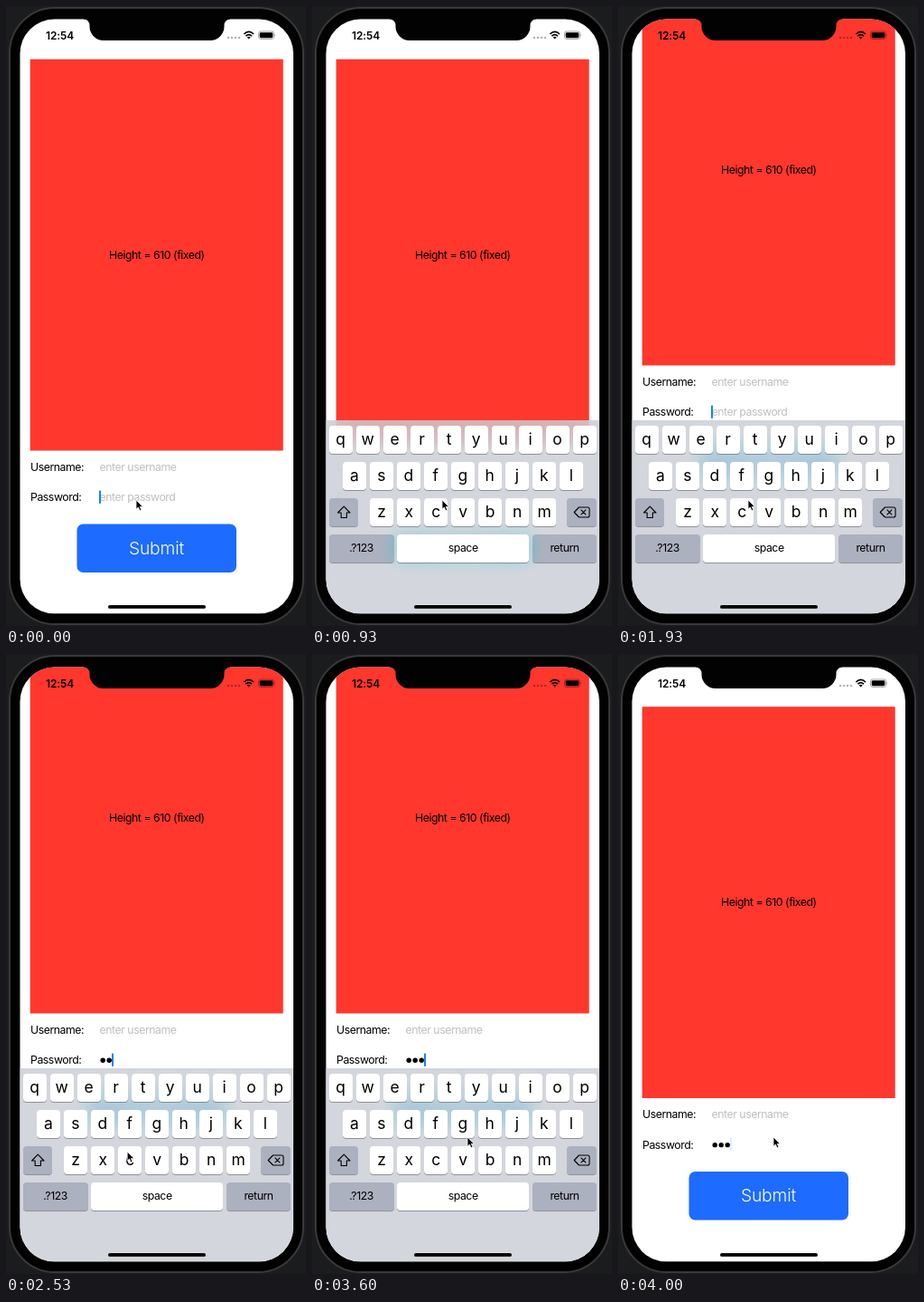
Recreate the animation shown at these times as an HTML page. Size 332 by 684 pixels, loop 4.07 s.

```html
<!DOCTYPE html>
<html lang="en">
<head>
<meta charset="utf-8">
<title>Keyboard avoidance</title>
<style>
  html, body { margin: 0; width: 100%; height: 100%; overflow: hidden; background: #1b1c1e; }
  #stage { position: relative; width: 332px; height: 684px; overflow: hidden;
    font: 400 12.3px Inter, "Open Sans", sans-serif; letter-spacing: -.46px; }
  #stage > *, #content, #keyboard, #blur, .key { position: absolute; }
  svg { display: block; overflow: visible; }
  #body { left: 3px; top: 1px; width: 323px; height: 678px; background: #020202;
    border: 2px solid #39393b; border-radius: 51px; }
  #screen { inset: 0; background: #fff; clip-path: inset(14.5px 14px 13.7px 15.5px round 38px); }
  #content { left: 0; top: 0; }
  #keyboard { left: 15px; top: 457px; width: 304px; height: 227px; }
  #blur { inset: 0; background: rgba(200, 204, 212, .8);
    backdrop-filter: blur(15px) brightness(1.6); }
  .key { box-sizing: border-box; border-radius: 4px; background: #fff; color: #000;
    box-shadow: 0 1px 0 rgba(60, 62, 70, .45); text-align: center; height: 31px; line-height: 30px; }
  .letter { font-size: 17.5px; letter-spacing: 0; }
  .special { background: rgba(136, 140, 152, .5); backdrop-filter: saturate(2.5); }
  .icon svg { position: absolute; left: 0; top: 0; }
  #overlay { left: 0; top: 0; }
  .hint { fill: #bfbfc2; }
</style>
</head>
<body>
<div id="stage">
  <div id="body"></div>
  <div id="screen">
    <svg id="content" width="332" height="684">
      <rect x="26.7" y="58.7" width="280" height="431.8" fill="#ff372d"/>
      <text x="166.8" y="279" text-anchor="middle">Height = 610 (fixed)</text>
      <text x="27" y="513">Username:</text>
      <text class="hint" x="103.5" y="513">enter username</text>
      <text x="27" y="546.3">Password:</text>
      <text class="hint" id="hint" x="103.5" y="546.3">enter password</text>
      <g id="dots"></g>
      <rect id="caret" x="103" y="534.5" width="2" height="14.5" rx=".8" fill="#1483f5"/>
      <rect x="78.5" y="571.5" width="176.5" height="53.5" rx="7" fill="#1d6bff"/>
      <text x="166.5" y="605" text-anchor="middle" fill="#fff" font-size="19.3" font-weight="300" letter-spacing="-.2">Submit</text>
    </svg>
    <div id="keyboard"><div id="blur"></div></div>
  </div>
  <svg id="overlay" width="332" height="684">
    <path d="M86 13V14.5A6.5 6.5 0 0 1 92.5 21V22.5A15.5 15.5 0 0 0 108 38H226A15.5 15.5 0 0 0 241.5 22.5V21A6.5 6.5 0 0 1 248 14.5V13Z" fill="#020202"/>
    <text x="44" y="36.6" font-size="12" font-weight="600" letter-spacing="-.1">12:54</text>
    <g id="signal" fill="#000" fill-opacity=".3"></g>
    <g fill="none" stroke="#000" stroke-width="1.7">
      <path d="M263.4 31Q268.7 25.6 274 31"/>
      <path d="M265.4 33.2Q268.7 29.9 272 33.2"/>
    </g>
    <path d="M266.7 34.5Q268.7 32.9 270.7 34.5L268.7 36.6Z"/>
    <rect x="279.5" y="28" width="17" height="8.4" rx="2.4" fill="none" stroke="#000" stroke-opacity=".45" stroke-width=".8"/>
    <rect x="280.7" y="29.2" width="14.6" height="6" rx="1.4"/>
    <path d="M297.6 30.7Q299 32.2 297.6 33.7Z" fill-opacity=".5"/>
    <rect x="113" y="661" width="108" height="3.8" rx="1.9"/>
    <path id="mouse" d="M0 0V10.2L2.4 8.1L4 11.8L5.9 11L4.3 7.4H7.5Z" stroke="#fff" stroke-width=".8" stroke-linejoin="round"/>
  </svg>
</div>
<script>
const $ = id => document.getElementById(id);
const keyboard = $('keyboard');

const circles = (xs, y, r) => xs.map(x => `<circle cx="${x}" cy="${y}" r="${r}"/>`).join('');
$('dots').innerHTML = circles([107.2, 114.2, 121.2], 542.2, 2.7);
$('signal').innerHTML = circles([246, 250, 254, 258], 35, 1.25);

// x and y are stage coordinates
function addKey(x, y, width, label, kind) {
  const key = document.createElement('div');
  key.className = 'key ' + kind;
  key.style.cssText = `left:${x - 15}px;top:${y - 457}px;width:${width}px`;
  key.innerHTML = label;
  keyboard.append(key);
}
const icon = path => `<svg width="33" height="31" fill="none" stroke="#000" stroke-width="1.1" stroke-linejoin="round"><path d="${path}"/></svg>`;

[['qwertyuiop', 18.6, 463], ['asdfghjkl', 33.8, 503], ['zxcvbnm', 64.2, 543]].forEach(([row, x, y]) =>
  [...row].forEach((letter, i) => addKey(x + i * 30, y, 26, letter, 'letter')));
addKey(18.6, 543, 32.6, icon('M16.3 9.2L23 16H19.4V21.5H13.2V16H9.6Z'), 'special icon');
addKey(282, 543, 32.8, icon('M13.5 10H23Q25 10 25 12V19Q25 21 23 21H13.5L8.2 15.5ZM15.6 12.7L21.2 18.3M21.2 12.7L15.6 18.3'), 'special icon');
addKey(18.6, 582.5, 72, '.?123', 'special');
addKey(94.2, 582.5, 146, 'space', '');
addKey(244, 582.5, 71, 'return', 'special');

const LOOP = 4070, TICK = 200 / 3;
const SHOW = 14 * TICK, HIDE = 54 * TICK, LIFT = 94, KEYBOARD_TRAVEL = 239;

// [time in ms, value], each held until the next entry
const caretSteps = [
  [0, 1], [530, .6], [600, .25], [670, 0], [930, 1],
  [1470, .6], [1530, .25], [1600, 0], [1800, .3], [1870, .65], [1930, 1],
  [3070, .75], [3130, .5], [3200, .32], [3270, 0], [3400, .3], [3470, .65], [3530, 1],
  [3870, .6], [3930, .35], [4000, .14]
];
const dotSteps = [[0, 0], [2330, 1], [2470, 2], [2600, 3]];
// [time in ms, x, y], eased between entries
const mousePath = [
  [0, 144, 545], [2270, 144, 545], [2600, 133, 549.5], [2870, 133, 549.5],
  [2930, 133, 550], [3200, 133, 550], [3530, 172, 533], [LOOP, 172, 533]
];

const held = (steps, t) => steps.findLast(([time]) => time <= t + 5)[1];

// critically damped spring with stiffness 1000 and mass 3
function spring(ms) {
  const s = Math.sqrt(1000 / 3) * Math.max(0, ms) / 1000;
  return 1 - (1 + s) * Math.exp(-s);
}

function mouseAt(t) {
  const i = Math.max(1, mousePath.findIndex(([time]) => time > t));
  const [t0, x0, y0] = mousePath[i - 1], [t1, x1, y1] = mousePath[i];
  const p = (t - t0) / (t1 - t0), e = p * p * (3 - 2 * p);
  return [x0 + (x1 - x0) * e, y0 + (y1 - y0) * e];
}

function draw(now) {
  const t = Math.min(60, Math.floor((now % LOOP + 5) / TICK)) * TICK;
  const hidden = spring(t - HIDE);
  const lift = LIFT * (spring(t - SHOW) - hidden);
  $('content').style.transform = `translateY(${-lift}px)`;
  keyboard.style.display = t >= SHOW - 1 ? 'block' : 'none';
  keyboard.style.transform = `translateY(${KEYBOARD_TRAVEL * hidden}px)`;

  const typed = held(dotSteps, t);
  [...$('dots').children].forEach((dot, i) => dot.setAttribute('visibility', i < typed ? 'visible' : 'hidden'));
  $('hint').setAttribute('visibility', typed ? 'hidden' : 'visible');
  $('caret').setAttribute('x', 103 + typed * 7);
  $('caret').setAttribute('opacity', held(caretSteps, t));
  $('mouse').setAttribute('transform', `translate(${mouseAt(t)})`);
}

const start = performance.now();
function frame() {
  draw(performance.now() - start);
  requestAnimationFrame(frame);
}
frame();
</script>
</body>
</html>
```
